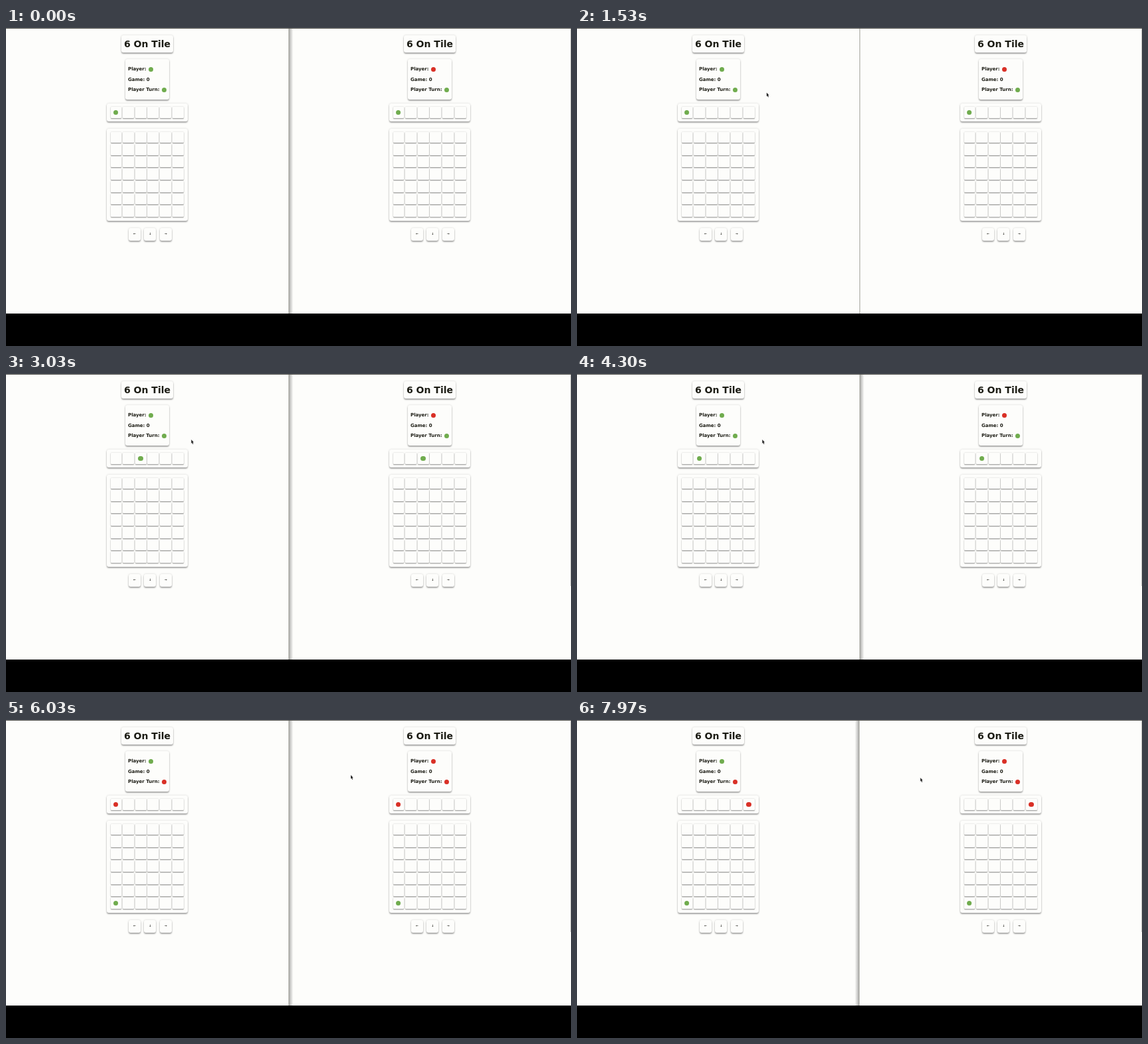
These frames come from a looping animation (852 by 480 pixels, 8 s). An HTML page:

```html
<!DOCTYPE html>
<html>
<head>
<meta charset="utf-8">
<style>
html, body { margin: 0; width: 852px; height: 480px; overflow: hidden; background: #000; }
#stage { position: relative; width: 852px; height: 431px; overflow: hidden; background: #fdfdfb; }
#stage div { position: absolute; }
.panel { top: 0; width: 426px; height: 431px; font: bold 7px/10px "DejaVu Sans", sans-serif; color: #1c1c14; white-space: pre; }
.card { background: #fdfdfb; border-radius: 3px; box-shadow: 0 2px 2px rgba(0,0,0,.3), 0 0 3px rgba(0,0,0,.16); text-align: center; }
.cell { background: #fdfdfb; border-radius: 1px; box-shadow: 0 1.2px 1.3px rgba(0,0,0,.33), 0 0 2px rgba(0,0,0,.2); }
.dot { width: 7.4px; height: 7.4px; border-radius: 50%; }
#cursor { position: absolute; left: 0; top: 0; }
</style>
</head>
<body>
<div id="stage"></div>
<script>
const LOOP = 8000, STEP = 18.65, GREEN = '#70ac4e', RED = '#d93026';
const TURN_ENDS = 5370, DROP_STARTS = 4700, FADE = 110;
const stage = document.getElementById('stage');

function add(parent, cls, x, y, w, h, text = '') {
  const el = document.createElement('div');
  el.className = cls;
  el.style.left = x + 'px';
  el.style.top = y + 'px';
  if (w) el.style.width = w + 'px';
  if (h) el.style.height = h + 'px';
  el.textContent = text;
  parent.append(el);
  return el;
}

function addStrip(x, y, w, h, fill) {
  const el = add(stage, '', x, y, w, h);
  el.style.background = fill;
  return el;
}

function addDot(parent, cx, cy, color) {
  const el = add(parent, 'dot', cx - 3.7, cy - 3.7);
  el.style.background = color;
  return el;
}

function addGrid(parent, top, rows) {
  for (let i = 0; i < rows * 6; i++)
    add(parent, 'cell', 157.5 + i % 6 * STEP, top + Math.floor(i / 6) * STEP, 16.8, 16.6);
}

function makePanel(x, color) {
  const p = add(stage, 'panel', x, 0);
  const title = add(p, 'card', 174, 10.5, 78, 26, '6 On Tile');
  title.style.font = 'bold 14px/26px "DejaVu Sans", sans-serif';
  add(p, 'card', 180, 47, 66, 60.5);
  ['Player:', 'Game: 0', 'Player Turn:'].forEach((s, i) => add(p, '', 184, 57 + i * 15.6, 0, 0, s));
  addDot(p, 218.2, 62.2, color);
  add(p, 'card', 152, 114, 122, 27);
  addGrid(p, 119, 1);
  add(p, 'card', 152, 152, 122, 139);
  addGrid(p, 156.5, 7);
  ['←', '↓', '→'].forEach((s, i) => {
    add(p, 'card', 185 + i * 23.4, 302, 18, 18.5, s).style.font = 'bold 4.5px/18px "DejaVu Sans", sans-serif';
  });
  return {
    turn: addDot(p, 238.3, 93.3, GREEN),
    tokens: Array.from({ length: 6 }, (_, i) => addDot(p, 165.6 + i * STEP, 127.6, GREEN)),
    piece: addDot(p, 165.6, 0, GREEN)
  };
}

const panels = [makePanel(0, GREEN), makePanel(426, RED)];
addStrip(0, 0, 852, 1, '#555550');
addStrip(851, 1, 1, 319, '#c8c8c4');
const line = addStrip(426, 1, 1, 430, '#a4a49c');
const shade = 'rgba(0,0,0,.3), transparent)';
const glowRight = addStrip(427, 1, 6, 430, 'linear-gradient(90deg, ' + shade);
const glowLeft = addStrip(419, 1, 6, 430, 'linear-gradient(270deg, ' + shade);
stage.insertAdjacentHTML('beforeend',
  '<svg id="cursor" width="6" height="9"><path d="M.4 .4V6.2L1.6 5.2 2.6 7.4 3.5 7 2.6 4.8H4.2Z" fill="#222"/></svg>');
const cursor = document.getElementById('cursor');

// Key press times; the column wraps around
const rights = [2470, 2870, 3090, 3530, 6800, 6920];
const lefts = [3800, 3990, 4180, 4600, 7200, 7440, 7740];
const presses = [...rights, ...lefts];

const clamp = v => Math.max(0, Math.min(1, v));
const ramp = (t, start, length) => clamp((t - start) / length);
const count = (times, t) => times.filter(s => s <= t).length;
const column = t => (count(rights, t) - count(lefts, t) + 6) % 6;
const bezier = (k, a, b, c, d) =>
  (1 - k) ** 3 * a + 3 * k * (1 - k) ** 2 * b + 3 * k * k * (1 - k) * c + k ** 3 * d;

function cursorAt(t) {
  const enter = 1 - ramp(t, 500, 100), sweep = ramp(t, 770, 760);
  const nudge = ramp(t, 1630, 150), cross = ramp(t, 5430, 600), settle = ramp(t, 6030, 200);
  return [
    bezier(sweep, 691, 640, 65, 285.5) + 79 * enter - 6.5 * nudge + 240.5 * cross - 2.2 * settle,
    bezier(sweep, 235, 608, 300, 97) - 6 * enter + 1.5 * nudge - 16 * cross + 4 * settle
  ];
}

function draw(t) {
  const last = Math.max(-FADE, ...presses.filter(s => s <= t));
  const now = column(t), before = column(last - 1), fade = ramp(t, last, FADE);
  const color = t < TURN_ENDS ? GREEN : RED;
  const row = Math.min(6, Math.floor((t - DROP_STARTS) / 100));
  for (const { turn, tokens, piece } of panels) {
    turn.style.background = color;
    tokens.forEach((el, i) => {
      el.style.background = color;
      el.style.opacity = i === now ? fade : i === before ? 1 - fade : 0;
    });
    piece.style.opacity = row < 0 ? 0 : 1;
    piece.style.top = 161.2 + row * STEP + 'px';
  }

  // Window focus: left, none, left, right
  const toRight = ramp(t, 6080, 120);
  glowRight.style.opacity = 1 - ramp(t, 30, 150) + ramp(t, 1700, 150) - toRight;
  glowLeft.style.opacity = toRight;
  line.style.left = (toRight ? 425 : 426) + 'px';

  const [x, y] = cursorAt(t);
  cursor.style.display = t < 500 ? 'none' : '';
  cursor.style.transform = `translate(${x}px, ${y}px)`;
}

const begin = performance.now();
function tick() {
  draw((performance.now() - begin) % LOOP);
  requestAnimationFrame(tick);
}
tick();
</script>
</body>
</html>
```
